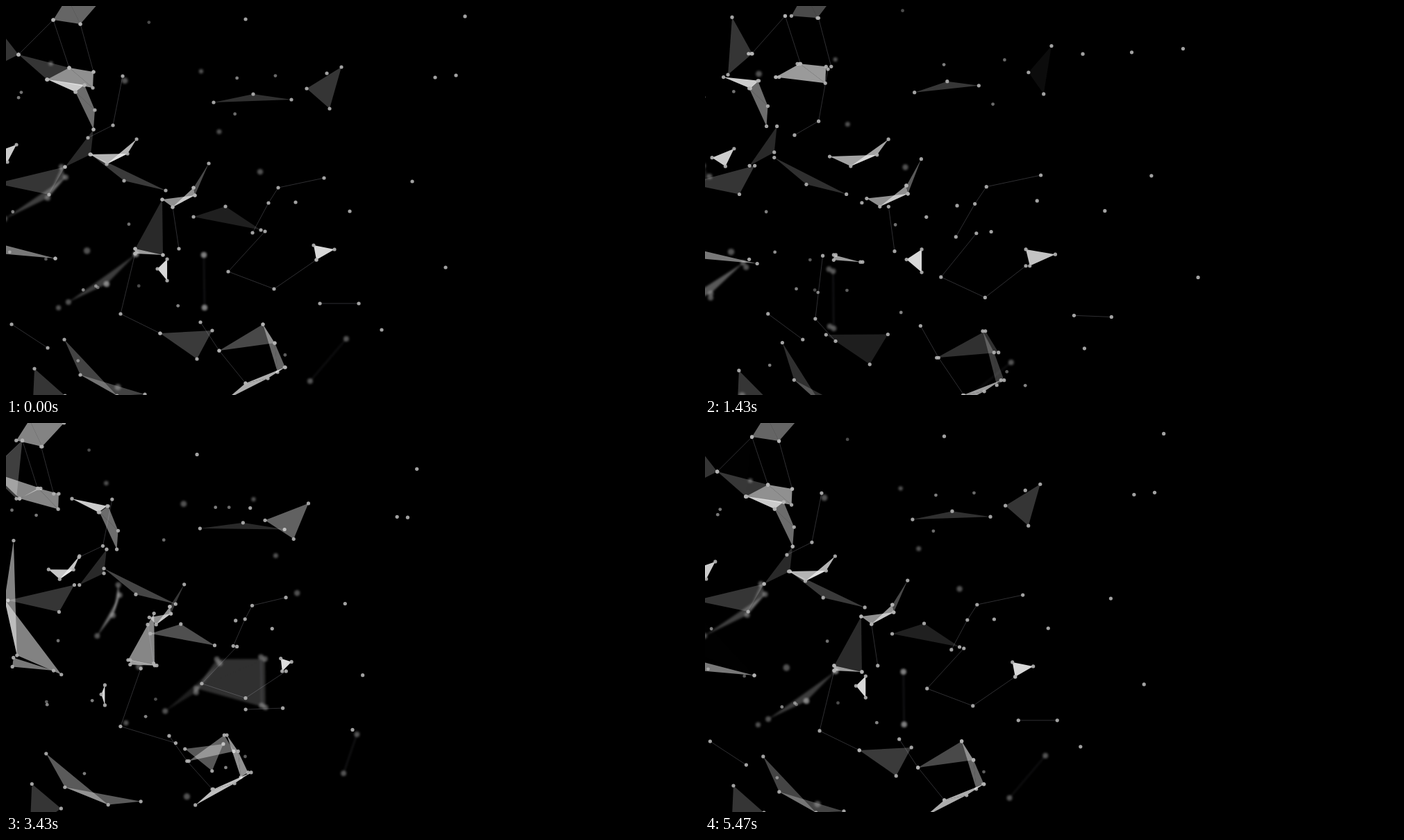
Write an HTML page that moves like this. It is 998x561 px and loops after 5500 ms.

```html
<!DOCTYPE html>
<html lang="en">
<head>
<meta charset="utf-8">
<title>Drifting network</title>
<style>
  html, body { margin: 0; width: 100%; height: 100%; overflow: hidden; background: #000; }
  svg { display: block; width: 100vw; height: 100vh; }
  polygon { fill: #f0f0f0; }
  polyline { fill: none; stroke: #c4c4d0; stroke-width: 1; opacity: .24; }
  circle { fill: #b4b4b4; }
</style>
</head>
<body>
<svg id="stage" viewBox="0 0 998 561">
  <defs>
    <filter id="blur" filterUnits="userSpaceOnUse" x="-50" y="-50" width="1100" height="660">
      <feGaussianBlur stdDeviation="1.8"/>
    </filter>
  </defs>
</svg>
<script>
const LOOP = 5.5;
const svg = document.getElementById('stage');
const clamp = (v, lo = 0, hi = 1) => Math.min(hi, Math.max(lo, v));

function add(parent, name, attrs = {}) {
  const el = document.createElementNS('http://www.w3.org/2000/svg', name);
  set(el, attrs);
  parent.append(el);
  return el;
}

function set(el, attrs) {
  for (const key in attrs) el.setAttribute(key, attrs[key]);
}

function seeded(seed) {
  return () => {
    seed = (seed * 16807) % 2147483647;
    return seed / 2147483647;
  };
}

// Turning about a vertical axis: x bends back towards the middle,
// y spreads away from the horizon as parts come closer.
function locate({ x, y, vx, lift }, u) {
  const vy = (y - 300) * x / 5200 + lift;
  const ax = .07 * vx - .037 * (x - 90);
  return [x + vx * u + ax * u * u / 2, y + vy * u + .055 * vy * u * u]
    .map(v => v.toFixed(2));
}

const items = [];

// turn: how much faster the right end of a part drifts than its left end
function addItem(speed, path, { turn = 0, lift = 0, ...look }) {
  const pairs = path.split(' ').map(pair => pair.split(',').map(Number));
  const middle = pairs.reduce((sum, [x]) => sum + x, 0) / pairs.length;
  const points = pairs.map(([x, y]) => ({ x, y, lift, vx: speed + turn * (x - middle) }));
  items.push({ points, radius: 2.6, shade: .9, ...look });
}

// A strip of triangles: each vertex joins the two before it.
const shard = (speed, path, alpha, rate = 0, look = {}) =>
  addItem(speed, path, { alpha, rate, ...look });
const thread = (speed, path, look = {}) => addItem(speed, path, { line: true, ...look });
const dot = (speed, x, y, look = {}) => addItem(speed, `${x},${y}`, look);

const NEAR = { blur: true, radius: 4, shade: .45 };

// blurred foreground
shard(-90, '187,358 145,401 90,427', .25, .08, { ...NEAR, turn: .1, lift: 6 });
shard(-76, '187,358 285,359 145,401 286,435', 0, -.13, { ...NEAR, turn: .17, lift: 10 });
shard(-65, '80,232 86,247 60,277 -2,307', .26, -.12, { ...NEAR, turn: .4 });
thread(-62, '285,359 286,435', { ...NEAR, lift: 12 });
thread(-33, '490,480 438,541', { ...NEAR, turn: .4, lift: 5 });

// upper left
shard(37, '68,20 107,26 88,-12 140,-12', .42, -.08);
shard(28, '18,70 59,106 91,89', .22, -.22);
shard(31, '59,106 91,89 125,118 126,95', .6, .03, { turn: .08 });
shard(38, '-26,14 18,70 -35,97', .22, 0, { turn: -.2 });
shard(31, '68,20 18,70 59,106', 0, -.17);
thread(31, '18,70 68,20 91,89');
thread(38, '107,26 126,95');

// chain drifting left
shard(-23, '60,106 113,114 100,124', .85);
shard(-24, '113,114 100,124 128,150 126,178', .45);
shard(-14, '126,178 122,214 85,232', .17);
shard(-14, '122,214 170,252 230,266', .24, -.03, { lift: 5 });
shard(-9, '85,232 62,272 -15,256', .22);
shard(-12, '-14,170 -30,255 -8,335 71,364', 0, -.35, { turn: .1 });
shard(-5, '-6,344 -8,357 71,364', .5, 0, { turn: .14, lift: 4 });

// far pieces drifting right
shard(16, '-18,212 15,200 2,225', .85, 0, { lift: 4 });
shard(47, '121,214 145,228 175,213 188,192', .75, -.05, { turn: .2, lift: 4 });
shard(55, '232,365 218,379 232,396', .9, 0, { turn: .4, lift: -12 });
thread(8, '168,101 154,172 118,190');

// middle
shard(14, '225,279 240,290 272,273 270,262', .6, 0, { turn: .2 });
shard(18, '270,262 272,273 292,227', .3, .05);
shard(4, '225,279 226,359 186,350', .17, -.25, { lift: 4 });
shard(2, '186,350 186,357 226,359', .65, 0, { lift: 4 });
shard(37, '270,304 316,289 367,323', .13, -.13);
thread(20, '240,290 249,350');
thread(-10, '186,357 165,444 222,472', { turn: -.3 });
thread(17, '458,248 392,262 378,284 355,327', { turn: .15, lift: 2 });

// right
shard(25, '443,345 473,351 447,366', .9, -.06, { turn: .3 });
shard(2, '299,139 356,127 411,135', .2, .02, { turn: -.09 });
shard(25, '433,119 483,88 466,148', .22, -.12, { turn: -.2 });
thread(19, '373,325 320,383 386,408 447,366');
thread(62, '452,429 508,429');

// bottom
shard(4, '41,523 85,562 38,590', .22);
shard(10, '84,481 107,532 160,562 200,560', .28, -.06, { turn: -.15 });
shard(-22, '222,472 275,509 297,468', .24, -.08, { turn: .15, lift: -6 });
shard(28, '307,497 370,459 387,486', .3, -.07, { turn: .1, lift: -5 });
shard(27, '370,459 387,486 391,528 402,521', .42, -.12, { lift: -5 });
shard(24, '402,521 377,537 345,544 318,567', .72, -.05, { lift: -5 });
thread(25, '280,456 307,497 345,544', { lift: -5 });
thread(53, '8,459 60,493', { lift: -10 });

// loose sparks at the thin right edge, then a seeded scatter on the dense side
dot(41, 648, 100);
dot(11, 618, 103);
dot(30, 661, 15);
dot(51, 585, 253);
dot(65, 633, 377);
dot(15, 541, 467);
dot(64, 495, 296);
dot(49, 417, 283);
dot(64, 462, 97);
dot(40, 345, 19);

const random = seeded(41);
for (let i = 0; i < 26; i++) {
  const speed = -70 + 140 * random();
  const near = speed < -35;
  dot(speed, 410 * random(), 561 * random(),
    near ? { ...NEAR, radius: 3 + 2 * random() } : { radius: 2.4, shade: .4 + .4 * random() });
}

function buildLayer() {
  const root = add(svg, 'g');
  const parts = items.map(item => {
    const g = add(root, 'g', item.blur ? { filter: 'url(#blur)' } : {});
    const faces = item.alpha === undefined ? [] : item.points.slice(2).map(() => add(g, 'polygon'));
    const line = item.line && add(g, 'polyline');
    const dots = item.points.map(() => add(g, 'circle', { r: item.radius, opacity: item.shade }));
    return { ...item, faces, line, dots };
  });

  return (u, opacity) => {
    root.style.display = opacity > 0 ? '' : 'none';
    if (opacity <= 0) return;
    set(root, { opacity });
    for (const { points, alpha, rate, faces, line, dots } of parts) {
      const pos = points.map(p => locate(p, u));
      faces.forEach((el, i) => set(el, {
        points: pos.slice(i, i + 3).join(' '),
        opacity: clamp(alpha + rate * u, 0, .92)
      }));
      if (line) set(line, { points: pos.join(' ') });
      dots.forEach((el, i) => set(el, { cx: pos[i][0], cy: pos[i][1] }));
    }
  };
}

const drawOutgoing = buildLayer();
const drawIncoming = buildLayer();

// The incoming pass slows down before it meets the start of the loop.
const SLOW_AT = 4.63, SLOW_SPAN = .35;
function incomingTime(t) {
  return t < SLOW_AT
    ? t - SLOW_AT - SLOW_SPAN
    : -SLOW_SPAN * (LOOP - t) / (LOOP - SLOW_AT);
}

function render(t) {
  const fade = clamp(t - 2);
  drawOutgoing(t, 1 - fade);
  drawIncoming(incomingTime(t), fade);
}

const start = performance.now();
function tick() {
  render((performance.now() - start) / 1000 % LOOP);
  requestAnimationFrame(tick);
}
tick();
</script>
</body>
</html>
```
